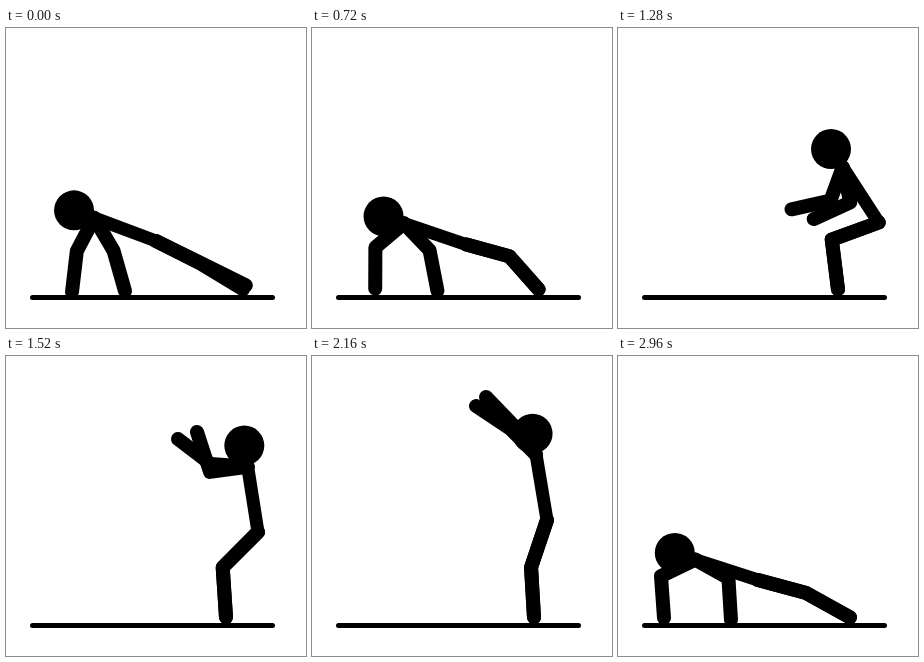
Recreate the animation shown at these times as an HTML page. Size 300 by 300 pixels, loop 3040 ms.

```html
<!DOCTYPE html>
<html lang="en">
<head>
<meta charset="utf-8">
<title>Burpee</title>
<style>
html, body { margin: 0; width: 100%; height: 100%; overflow: hidden; background: #fff; }
svg { display: block; width: 100vw; height: 100vh; }
path { fill: none; stroke: #000; stroke-width: 14; stroke-linecap: round; stroke-linejoin: round; }
.torso { stroke-width: 13; }
.ground { stroke-width: 5; }
</style>
</head>
<body>
<svg viewBox="0 0 300 300">
  <path class="ground" d="M26.5 269.5H266.5"/>
  <path id="legA"/>
  <path id="legB"/>
  <path class="torso" id="torso"/>
  <path id="armL"/>
  <path id="armR"/>
  <circle id="head" r="20"/>
</svg>
<script>
const STEP = 80, STEPS = 38;
const TORSO = 66, NECK = 21.5, LEG = [50, 50], ARM = [38, 42];
const FLOOR = 261.3;

// foot: x on the floor; lean: degrees from upright;
// bend: knee, left elbow, right elbow, from -1 to 1; gap: how far the feet part.
const plank = { foot: 237, hip: [150, 213], lean: 69.5, left: [66, 264], right: [119, 263], bend: [-0.4, 0.7, -1], gap: 4 };
const dip   = { foot: 239, hip: [142, 240], lean: 69, left: [57, 260], right: [119, 262], bend: [0, 1, -1] };
const sink  = { foot: 232, hip: [140, 224], lean: 72, left: [46, 262], right: [113, 264], bend: [-1, 1, -1] };
const tuck  = { foot: 220, hip: [217, 205], lean: 65.6, left: [134, 251], right: [174, 254], bend: [1, 0.4, -0.3] };
const squat = { foot: 220, hip: [266, 190], lean: 22, left: [178, 150], right: [198, 160], bend: [1, -1, -1] };
const rise  = { foot: 220, hip: [252, 176], lean: 9, left: [172, 83], right: [191, 76], bend: [1, -0.8, -1] };
const leap  = { foot: 222, hip: [226, 157], lean: 2, left: [220, 12], right: [224, 12], bend: [1, 0, 0] };
const reach = { foot: 222, hip: [235, 164], lean: 9.5, left: [164, 50], right: [174, 41], bend: [1, 0.4, 0.2] };
const dive  = { foot: 226, hip: [165, 183], lean: 53, left: [38, 166], right: [55, 195], bend: [-0.2, 0.5, 0.1], gap: 3 };

const LEAP_AT = 24;
const keys = [
  [0, plank], [5, dip], [7, sink], [13, tuck], [17, squat],
  [19, rise], [LEAP_AT, leap], [27, reach], [31, dive], [37, sink]
].map(([at, p]) => ({
  at,
  v: [p.foot, p.lean, p.gap || 0, ...p.hip, ...p.left, ...p.right, ...p.bend]
}));

// Cubic interpolation that rests at turning points and never overshoots.
function poseAt(n) {
  let i = 0;
  while (i < keys.length - 2 && n >= keys[i + 1].at) i++;
  const a = keys[i], b = keys[i + 1];
  const span = b.at - a.at, u = (n - a.at) / span, w = 1 - u;
  const slope = (j, c) => (keys[j + 1].v[c] - keys[j].v[c]) / (keys[j + 1].at - keys[j].at);
  const tangent = (j, c) => {
    if (j === 0 || j === keys.length - 1) return 0;
    const before = slope(j - 1, c), after = slope(j, c);
    return before * after <= 0 ? 0 : 2 * before * after / (before + after);
  };
  return a.v.map((start, c) =>
    start * (1 + 2 * u) * w * w + b.v[c] * u * u * (3 - 2 * u)
    + span * u * w * (w * tangent(i, c) - u * tangent(i + 1, c)));
}

// Middle joint of a two-bone limb.
function joint(a, b, [first, second], bend) {
  const dx = b[0] - a[0], dy = b[1] - a[1];
  const d = Math.hypot(dx, dy), reach = first + second;
  const along = d < reach
    ? (first * first - second * second + d * d) / (2 * d)
    : d * first / reach;
  const off = d < reach ? bend * Math.sqrt(Math.max(0, first * first - along * along)) : 0;
  return [a[0] + (dx * along - dy * off) / d, a[1] + (dy * along + dx * off) / d];
}

const el = id => document.getElementById(id);
function line(id, ...points) {
  el(id).setAttribute("d", "M" + points.map(p => p.map(v => v.toFixed(2)).join(" ")).join("L"));
}
function limb(id, from, to, bones, bend) {
  line(id, from, joint(from, to, bones, bend), to);
}

function draw(n) {
  const [foot, lean, gap, hx, hy, lx, ly, rx, ry, knee, elbowL, elbowR] = poseAt(n);
  const angle = lean * Math.PI / 180;
  const spine = r => [hx - r * Math.sin(angle), hy - r * Math.cos(angle)];
  const hip = [hx, hy], shoulder = spine(TORSO), head = spine(TORSO + NECK);
  const hop = 5 * Math.max(0, 1 - ((n - LEAP_AT) / 2) ** 2);
  const sole = FLOOR - hop;

  limb("legA", hip, [foot, sole], LEG, knee);
  limb("legB", hip, [foot + gap * 0.7, sole - gap], LEG, knee);
  line("torso", hip, shoulder);
  limb("armL", shoulder, [lx, ly], ARM, elbowL);
  limb("armR", shoulder, [rx, ry], ARM, elbowR);
  el("head").setAttribute("cx", head[0]);
  el("head").setAttribute("cy", head[1]);
}

const begin = performance.now();
function tick() {
  draw(Math.floor((performance.now() - begin) / STEP) % STEPS);
  requestAnimationFrame(tick);
}
tick();
</script>
</body>
</html>
```
